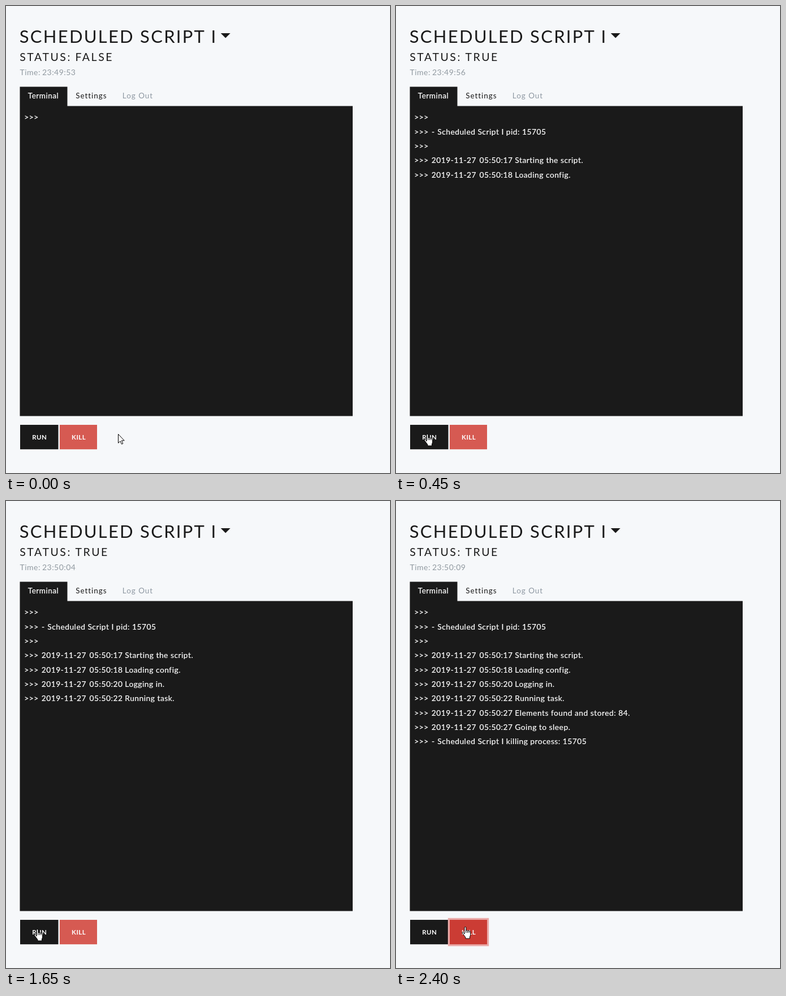
Write an HTML page that moves like this. It is 679 px wide and 824 px high and loops after 2550 ms.

```html
<!DOCTYPE html>
<html lang="en">
<head>
<meta charset="utf-8">
<title>Scheduled Script</title>
<style>
  html, body { margin: 0; width: 100%; height: 100%; overflow: hidden; background: #f6f8fa; }
  svg { display: block; width: 679px; height: 824px; font: 14px Lato, "Open Sans", sans-serif; fill: #1a1a1a; }
  text { white-space: pre; }
  .title { font-size: 31px; letter-spacing: 2.25px; }
  .status { font-size: 19.5px; letter-spacing: 2.55px; }
  .time { fill: #919aa1; letter-spacing: .45px; }
  .tab { font-size: 13.5px; letter-spacing: .95px; }
  .active { fill: #fff; stroke: #fff; stroke-width: .25px; letter-spacing: .55px; }
  .muted { fill: #8f99a3; }
  #log { font-size: 13.8px; fill: #fff; stroke: #fff; stroke-width: .22px; letter-spacing: .5px; }
  .label { font-size: 11.5px; font-weight: 700; letter-spacing: .5px; fill: #fff; }
  .cursor { fill: #fff; stroke: #000; stroke-linejoin: round; }
</style>
</head>
<body>
<svg viewBox="0 0 679 824">
  <text class="title" x="23.8" y="65">SCHEDULED SCRIPT I</text>
  <path d="M379.7 48h17l-8.5 8.6z"/>
  <text class="status" y="96.5"><tspan x="24.2">STATUS:</tspan><tspan id="status" x="122.4">FALSE</tspan></text>
  <text class="time" y="122"><tspan x="24.6">Time:</tspan><tspan id="clock" x="64">23:49:53</tspan></text>

  <path d="M24.5 142.6h84v34h504.5v546.8H24.5z"/>
  <text class="tab active" x="38.8" y="163">Terminal</text>
  <text class="tab" x="123.2" y="163">Settings</text>
  <text class="tab muted" x="205.8" y="163">Log Out</text>
  <g id="log"></g>

  <rect id="runRing" x="21.8" y="735.8" width="73.4" height="49.6" fill="#979899"/>
  <rect id="run" x="25" y="739" width="67.5" height="43.2"/>
  <text class="label" x="46.2" y="764.5">RUN</text>
  <rect id="killRing" x="91.8" y="735.8" width="72.4" height="49.6" fill="#eaa9a7"/>
  <rect id="kill" x="95" y="739" width="66" height="43.2"/>
  <text class="label" x="116" y="764.5">KILL</text>

  <path id="arrow" class="cursor" d="M198.5 755.5v15.6l3.6-3.3 2.4 5.3 2.3-1-2.4-5.3h4.8z"/>
  <g id="hand" class="cursor">
    <path d="M5 13V2q0-1.5 1.5-1.5T8 2v5.5q.3-1 1.5-1t1.3 1.4q.3-.9 1.4-.9t1.3 1.4q.3-.8 1.3-.8t1.3 1.5v5q0 2-1.2 4v2.9H7v-2q-1-1.5-2.3-3L1.5 12q-1.2-1.4-.2-2.2 1.2-.8 2.2.4z"/>
    <path d="M8 7.5v3.5M10.8 8v3M13.5 8.5v2.5" fill="none"/>
  </g>
</svg>
<script>
  const STEP = 150, LOOP = 2550;
  const $ = id => document.getElementById(id);
  const day = '2019-11-27';

  // [time shown, [x, text] columns after the prompt]
  const stamped = (at, sec, msg) => [at, [[62.8, day], [147.5, '05:50:' + sec], [210.3, msg]]];
  const noted = (at, msg) => [at, [[63, '-'], [73.2, msg]]];
  const lines = [
    [0, []],
    noted(300, 'Scheduled Script I pid: 15705'),
    [300, []],
    stamped(300, 17, 'Starting the script.'),
    stamped(450, 18, 'Loading config.'),
    stamped(750, 20, 'Logging in.'),
    stamped(1050, 22, 'Running task.'),
    stamped(1800, 27, 'Elements found and stored: 84.'),
    stamped(1800, 27, 'Going to sleep.'),
    noted(2400, 'Scheduled Script I killing process: 15705')
  ];

  const make = (name, attrs, parent) => {
    const el = document.createElementNS('http://www.w3.org/2000/svg', name);
    for (const key in attrs) el.setAttribute(key, attrs[key]);
    return parent.appendChild(el);
  };

  const rows = lines.map(([at, cols], i) => {
    const el = make('text', { y: Math.round(201.4 + 25.3 * i) }, $('log'));
    for (const [x, str] of [[32.3, '>>>'], ...cols])
      make('tspan', { x }, el).textContent = str;
    return { at, el };
  });

  const show = (el, on) => el.setAttribute('visibility', on ? 'visible' : 'hidden');

  // One second per step, with one second skipped at 600 ms and two more by 750 ms made up after.
  function clockText(t) {
    const n = Math.floor(t / STEP);
    const sec = n < 4 ? 53 + n : n < 7 ? 54 + Math.min(n, 5) : 53 + n;
    const pad = v => String(v).padStart(2, '0');
    return `23:${49 + Math.floor(sec / 60)}:${pad(sec % 60)}`;
  }

  function draw(t) {
    rows.forEach(r => show(r.el, t >= r.at));
    $('clock').textContent = clockText(t);
    $('status').textContent = t < 450 ? 'FALSE' : 'TRUE';

    $('run').setAttribute('fill', t >= 150 && t < 450 ? '#050505' : '#1a1a1a');
    $('kill').setAttribute('fill', t >= 2100 ? '#cb3c34' : '#d65a52');
    show($('runRing'), t >= 300 && t < 450);
    show($('killRing'), t >= 2400);

    show($('arrow'), t < 150);
    show($('hand'), t >= 150);
    $('hand').setAttribute('transform',
      `translate(${t < 2100 ? '49.3 755' : '116.3 751'}) scale(.95 1)`);
  }

  const start = performance.now();
  function tick() {
    draw((performance.now() - start) % LOOP);
    requestAnimationFrame(tick);
  }
  tick();
</script>
</body>
</html>
```
